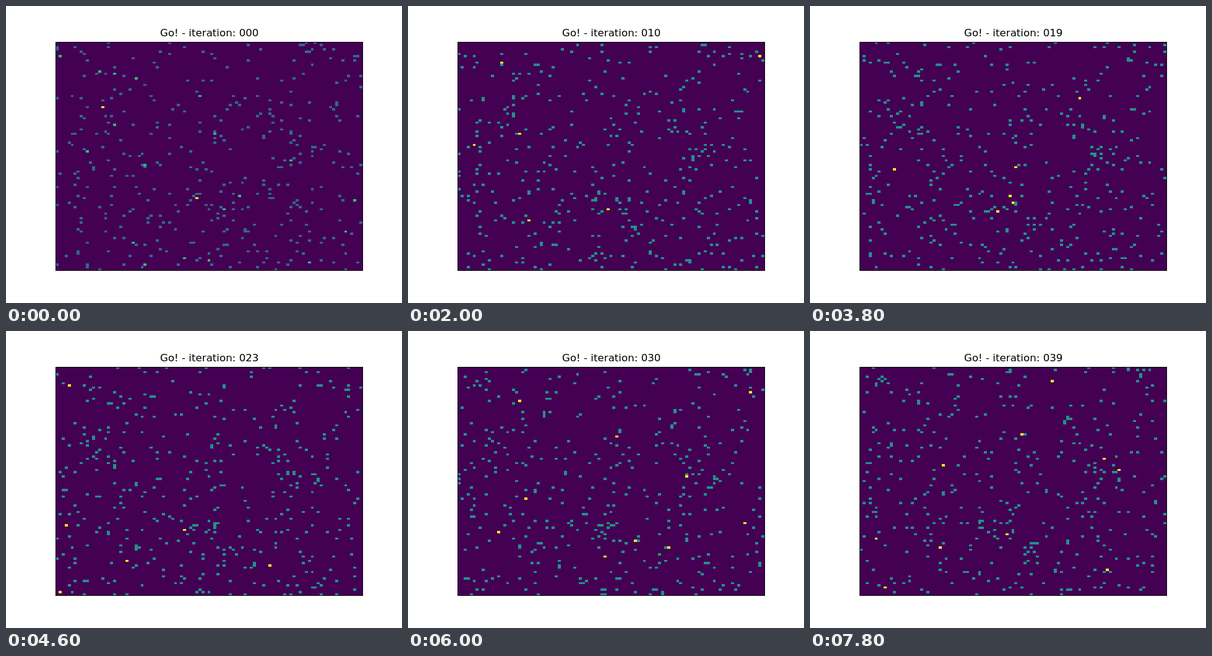
Recreate the animation shown at these times as an HTML page with a canvas. Size 640 by 480 pixels, loop 8000 ms.

```html
<!DOCTYPE html>
<html lang="en">
<head>
<meta charset="utf-8">
<title>Random walkers</title>
<style>
  html, body { margin: 0; width: 100%; height: 100%; overflow: hidden; background: #fff; }
  canvas { display: block; }
</style>
</head>
<body>
<canvas id="stage" width="640" height="480"></canvas>
<script>
const ctx = document.getElementById('stage').getContext('2d');
const COLS = 101, ROWS = 103, STEPS = 40, STEP_MS = 200;
const WALKERS = 400, PAIRS = 13;
const AXES = { x: 80, y: 57.6, w: 496, h: 369.6 };
const DARK = '#440154', BRIGHT = '#fde725';

let seed = 7;
function random() {
  seed = (seed + 0x6d2b79f5) | 0;
  let t = Math.imul(seed ^ (seed >>> 15), 1 | seed);
  t = (t + Math.imul(t ^ (t >>> 7), 61 | t)) ^ t;
  return ((t ^ (t >>> 14)) >>> 0) / 4294967296;
}
const below = n => Math.floor(random() * n);
const wrap = (v, n) => (v + n) % n;

// One triple and a few pairs share a starting cell; the rest start alone.
function makeWalkers() {
  const list = [];
  const place = (x, y, size) => {
    for (let i = 0; i < size; i++) list.push({ x, y });
  };
  place(46, 70, 3);
  for (let i = 0; i < PAIRS; i++) place(below(COLS), below(ROWS), 2);
  while (list.length < WALKERS) place(below(COLS), below(ROWS), 1);
  return list;
}

function step(walker) {
  return {
    x: wrap(walker.x + below(3) - 1, COLS),
    y: wrap(walker.y + below(3) - 1, ROWS)
  };
}

function countCells(walkers) {
  const counts = new Map();
  for (const { x, y } of walkers) {
    const cell = y * COLS + x;
    counts.set(cell, (counts.get(cell) || 0) + 1);
  }
  return counts;
}

// Every iteration is computed once, so the picture depends on the time alone.
const grids = [];
for (let walkers = makeWalkers(); grids.length < STEPS; walkers = walkers.map(step))
  grids.push(countCells(walkers));

const edgeX = c => Math.round(AXES.x + c * AXES.w / COLS);
const edgeY = r => Math.round(AXES.y + r * AXES.h / ROWS);

function draw(k) {
  const palette = k ? ['#21918c', BRIGHT] : ['#31688e', '#35b779', BRIGHT];
  ctx.fillStyle = '#fff';
  ctx.fillRect(0, 0, 640, 480);
  ctx.fillStyle = DARK;
  ctx.fillRect(80, 58, 496, 369);
  for (const [cell, n] of grids[k]) {
    const c = cell % COLS, r = Math.floor(cell / COLS);
    const x = edgeX(c), y = edgeY(r);
    ctx.fillStyle = palette[Math.min(n, palette.length) - 1];
    ctx.fillRect(x, y, edgeX(c + 1) - x, edgeY(r + 1) - y);
  }
  ctx.strokeStyle = '#000';
  ctx.lineWidth = 1;
  ctx.strokeRect(80.5, 58.5, 496, 369);
  ctx.fillStyle = '#000';
  ctx.font = '16.667px "DejaVu Sans", sans-serif';
  ctx.fillText('Go! - iteration: ' + String(k).padStart(3, '0'), 249, 49);
}

const start = performance.now();
let shown = -1;
function tick() {
  const k = Math.floor((performance.now() - start) / STEP_MS) % STEPS;
  if (k !== shown) draw(shown = k);
  requestAnimationFrame(tick);
}
tick();
</script>
</body>
</html>
```
